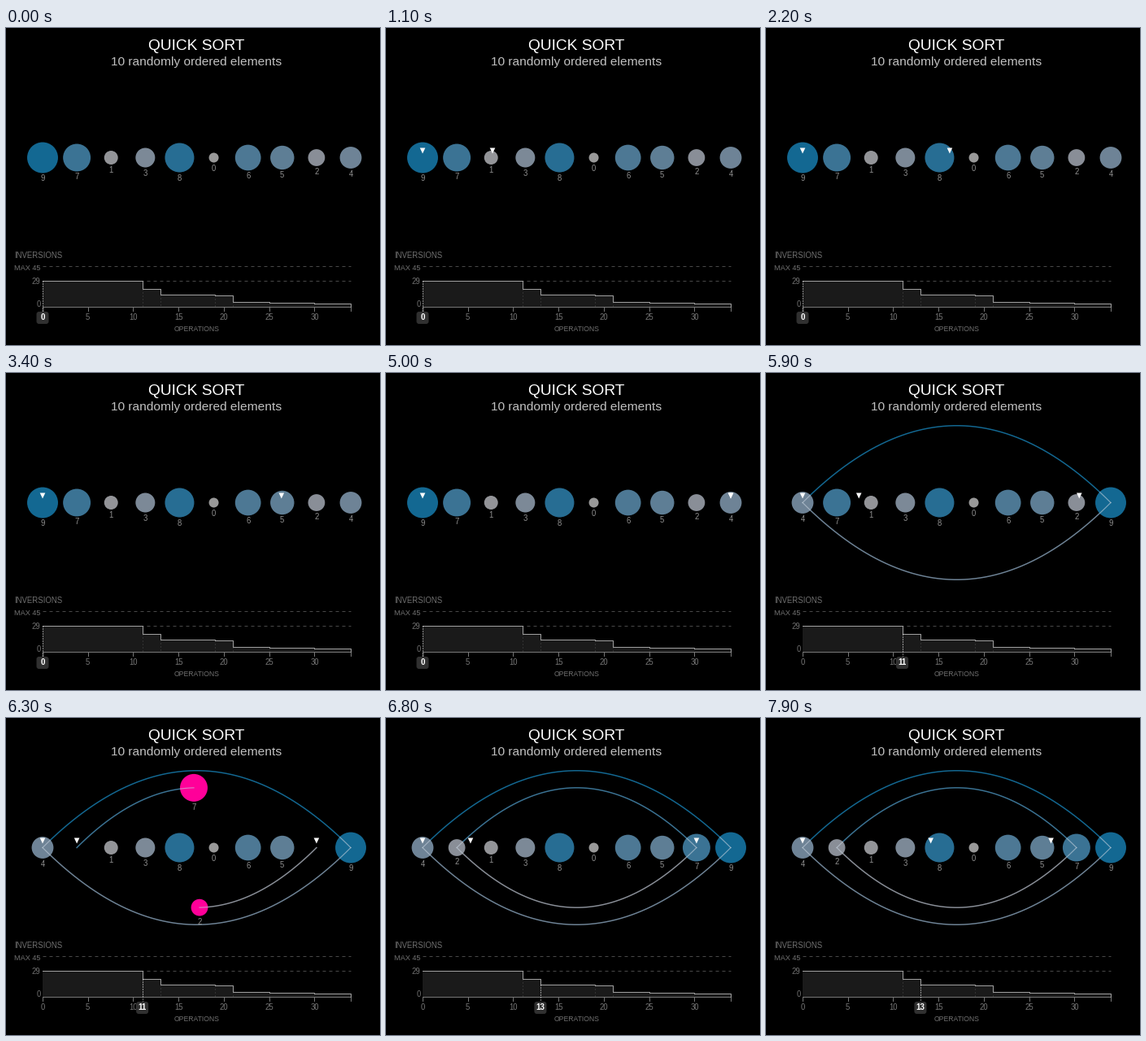
A matplotlib script for the animation above (8000 ms loop, 460 by 390 pixels).

```python
import numpy as np
import matplotlib.pyplot as plt
from matplotlib.animation import FuncAnimation
from matplotlib.patches import Circle, FancyBboxPatch, Polygon

W, H, DPI = 460, 390, 80
FRAMES, STEP = 80, 100
MOVE = 500                      # duration of one operation in ms
LEFT, RIGHT, MID = 45, 424, 159.5
PINK = "#ff0099"
VALUES = [9, 7, 1, 3, 8, 0, 6, 5, 2, 4]
INVERSIONS = [(0, 29), (11, 20), (13, 13), (19, 12),
              (21, 5), (25, 4), (30, 3), (34, 0)]
SWAPS = [(11, 0, 9), (13, 1, 8)]

plt.rcParams["font.family"] = "Liberation Sans"
fig = plt.figure(figsize=(W / DPI, H / DPI), dpi=DPI, facecolor="black")
ax = fig.add_axes([0, 0, 1, 1])
ax.set(xlim=(0, W), ylim=(H, 0))
ax.axis("off")


def px(n):
    return n * 72 / DPI


def text(x, y, s, size, color, ha="center", **kw):
    return ax.text(x, y, s, fontsize=px(size), color=color, ha=ha,
                   va="baseline", **kw)


def line(xs, ys, color, width=1, **kw):
    return ax.plot(xs, ys, color=color, lw=px(width), **kw)[0]


def slot(i):
    return LEFT + (RIGHT - LEFT) * i / 9


def radius(v):
    return 6 * np.sqrt(v + 1)


def shade(v):
    t = v / 9
    return ((153 - 134 * t ** 1.4) / 255, (153 - 49 * t) / 255,
            (153 - 7 * t) / 255)


def op_x(op):
    return LEFT + (RIGHT - LEFT) * op / 34


def inv_y(n):
    return 342.5 - 1.1 * n


def op_start(op):
    if op <= 10:
        return 500 * (op - 1) - 10
    return 5010 if op == 11 else 5536 + 516 * (op - 12)


def progress(t, op):
    """Cubic in-out progress of an operation at time t."""
    u = np.clip((t - op_start(op)) / MOVE, 0, 1)
    return 4 * u ** 3 if u < 0.5 else 1 - 4 * (1 - u) ** 3


def track(t, start, moves):
    """Position after a list of (operation, destination) moves."""
    x = start
    for op, dest in moves:
        x += (dest - x) * progress(t, op)
    return x


def arc(a, b, side, s):
    x0, x1 = slot(a), slot(b)
    return x0 + (x1 - x0) * s, MID + side * abs(x1 - x0) * s * (1 - s)


PIVOT = [(1, slot(0))]
LOW = ([(k, slot(k)) for k in range(1, 10)] + [(12, slot(1))]
       + [(k, slot(k - 12)) for k in (14, 15, 16)])
HIGH = [(10, slot(9)), (12, slot(8)), (16, slot(7))]


def draw_static():
    text(234.5, 27, "QUICK SORT", 19.1, "white")
    text(234.5, 46, "10 randomly ordered elements", 15.5, "#c0c0c0")
    text(10, 283, "INVERSIONS", 9.6, "#707070", "left")
    text(42.5, 297.5, "MAX 45", 9.1, "#707070", "right")
    text(42.5, 315, "29", 9.5, "#707070", "right")
    text(42.5, 343, "0", 9.5, "#707070", "right")
    text(234.5, 373, "OPERATIONS", 8.6, "#707070")

    xs = [op_x(op) for op, _ in INVERSIONS]
    ys = [inv_y(n) for _, n in INVERSIONS]
    ax.fill_between(xs, ys, 342.5, step="post", color="#1a1a1a", lw=0)
    for y in (292.5, 310.5):
        line([LEFT, RIGHT], [y, y], "#484848", ls=(0, (4, 4)))
    for x, y in zip(xs[1:-1], ys[1:-1]):
        line([x, x], [y, 342.5], "#4a4a4a", ls=(0, (1, 3)))
    line([LEFT, LEFT, RIGHT, RIGHT], [348, 342.5, 342.5, 348], "#777777")
    line(xs, ys, "#a0a0a0", drawstyle="steps-post")
    for op in range(0, 35, 5):
        x = op_x(op)
        line([x, x], [342.5, 348], "#777777")
        text(x, 359, op, 9.5, "#777777")


def draw_cursor(op, n):
    x = op_x(op)
    stem = line([x, x], [inv_y(n), 349], "white", ls=(0, (1, 2)), zorder=4)
    box = FancyBboxPatch((x - 5.5, 351), 11, 11, fc="#303030", ec="none",
                         boxstyle="round,pad=2,rounding_size=3", zorder=5)
    ax.add_patch(box)
    label = text(x, 359.3, op, 9.8, "white", weight="bold", zorder=6)
    return [stem, box, label]


def draw_ball(x, y, v, color):
    ball = Circle((x, y), radius(v), fc=color, ec="none", zorder=4)
    ax.add_patch(ball)
    label = text(x, y + radius(v) + 10, v, 9.5, "#909090", zorder=5)
    return ball, label


def draw_marker(x):
    tri = Polygon([(x - 3.3, 147.5), (x + 3.3, 147.5), (x, 154.5)],
                  fc="white", ec="none", zorder=8)
    ax.add_patch(tri)
    return tri


artists = []


def update(frame):
    t = frame * STEP
    while artists:
        artists.pop().remove()

    order = list(VALUES)
    spots = {v: (slot(i), MID, shade(v)) for i, v in enumerate(order)}
    trails, now = [], 0
    for op, a, b in SWAPS:
        p = progress(t, op)
        if t <= op_start(op) or p < 0.001:
            continue
        active = t < op_start(op) + MOVE
        for v, i, j, side in ((order[a], a, b, -1), (order[b], b, a, 1)):
            x, y = arc(i, j, side, p)
            spots[v] = (x, y, PINK if active else shade(v))
            trails.append((v, arc(i, j, side, np.linspace(0, p, 60))))
        order[a], order[b] = order[b], order[a]
        if not active:
            now = op

    balls = []
    for v, (x, y, color) in spots.items():
        ball, label = draw_ball(x, y, v, color)
        balls.append(ball)
        artists.extend((ball, label))

    for v, (xs, ys) in trails:
        artists.append(line(xs, ys, shade(v), 1.5, zorder=3))
        ends = [(xs[0], ys[0]), (xs[-1], ys[-1])]
        for ball in balls:
            # the path shows through the ball at either end
            if any(np.hypot(ball.center[0] - x, ball.center[1] - y) < 1
                   for x, y in ends):
                glow = line(xs, ys, "#c4d0dc", 1.2, alpha=0.6, zorder=6)
                glow.set_clip_path(ball)
                artists.append(glow)

    for start, moves in ((-100, PIVOT), (-100, LOW), (W + 100, HIGH)):
        artists.append(draw_marker(track(t, start, moves)))
    artists.extend(draw_cursor(now, dict(INVERSIONS)[now]))
    return artists


draw_static()
anim = FuncAnimation(fig, update, frames=FRAMES, interval=STEP,
                     init_func=lambda: artists, repeat=True, repeat_delay=0)
plt.show()
```
